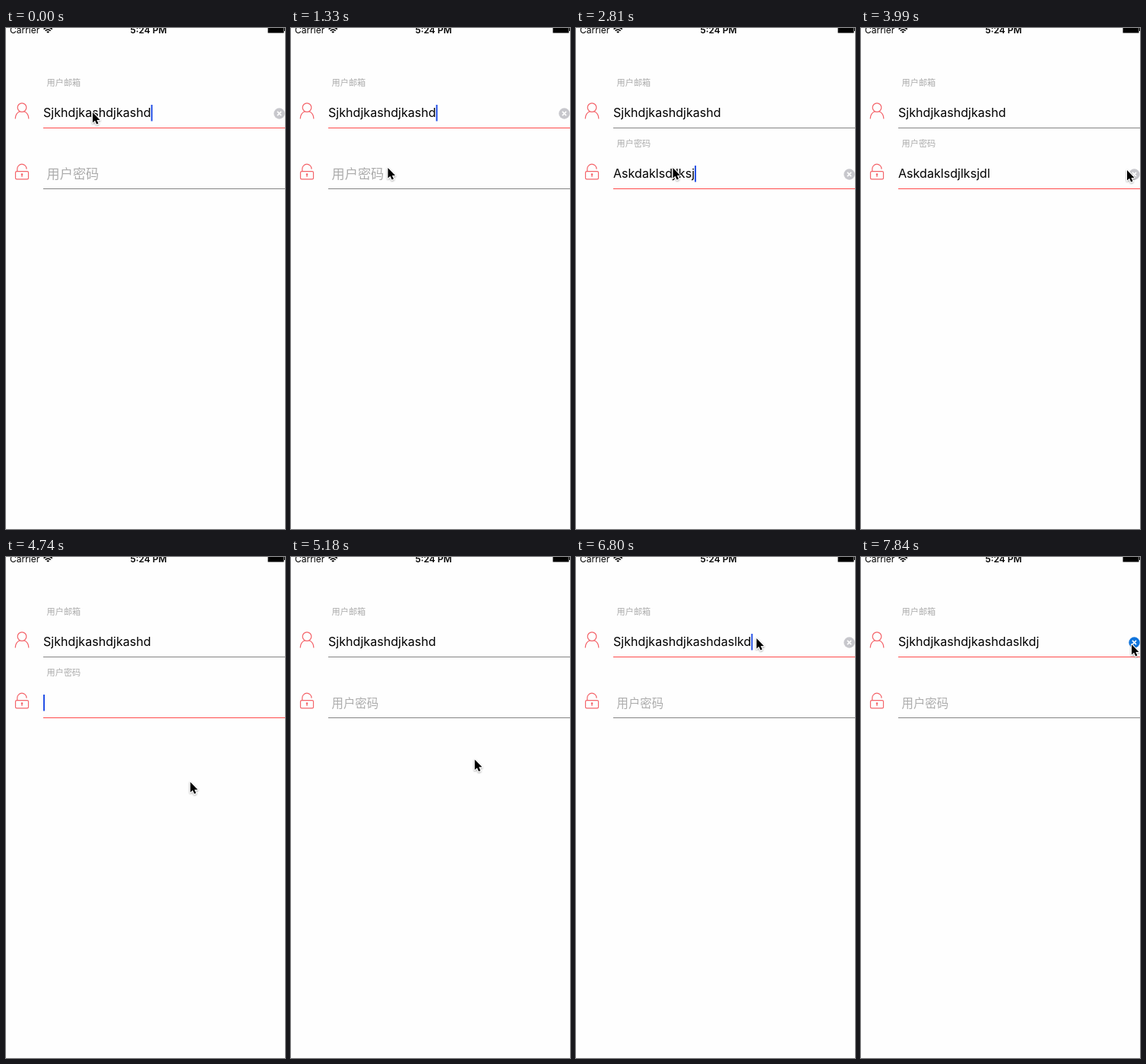
These frames come from a looping animation (367x659 px, 7990 ms). An HTML page:

```html
<!DOCTYPE html>
<html lang="zh">
<head>
<meta charset="utf-8">
<title>Login form</title>
<style>
  html, body { margin: 0; width: 100%; height: 100%; overflow: hidden; background: #fefefe; }
  svg { display: block; width: 367px; height: 659px; }
  text { font-family: Inter, "Liberation Sans", sans-serif; white-space: pre; }
  .value { font-size: 16.1px; }
  .label { font-family: "Noto Sans CJK SC", "Noto Sans CJK", sans-serif; fill: #acacac; }
  .icon { fill: none; stroke: #f4646a; stroke-width: 1.2; stroke-linecap: round; }
  .caret { fill: #2450e6; }
</style>
</head>
<body>
<svg viewBox="0 0 367 659">
  <defs>
    <filter id="shadow" x="-50%" y="-50%" width="200%" height="200%">
      <feDropShadow dx="0" dy="1" stdDeviation="0.8" flood-opacity="0.4"/>
    </filter>
  </defs>
  <rect width="367" height="659" fill="#fefefe"/>

  <text x="5" y="6.6" font-size="12">Carrier</text>
  <g fill="none" stroke="#000" stroke-width="1.6">
    <path d="M49.6 1.6Q55.2 -3.2 60.8 1.6M51.7 3.7Q55.2 .7 58.7 3.7"/>
    <path d="M53.2 4.9Q55.2 3.4 57.2 4.9L55.2 6.8Z" fill="#000" stroke="none"/>
  </g>
  <text x="163.5" y="6.6" font-size="11.9" font-weight="600">5:24 PM</text>
  <path d="M344.5 0H365.5V6.5H344.5ZM366 0H367V4H366Z"/>

  <g class="icon">
    <circle cx="21" cy="104.6" r="5.8"/>
    <path d="M12.3 119C12.5 114.5 14.6 111.2 18.2 109.8M29.8 119C29.6 114.5 27.5 111.2 23.9 109.8"/>
    <rect x="12.5" y="188.7" width="17" height="10.2" rx="1.6"/>
    <path d="M14.8 188.5V185.4A6.1 6.1 0 0 1 27 185.2M21 193V195.6"/>
    <circle cx="21" cy="192.6" r=".7"/>
  </g>

  <g id="email"></g>
  <g id="password"></g>

  <g id="cursor" filter="url(#shadow)">
    <path d="M0 0V13.6L3.1 10.8L5.2 15.6L7.5 14.6L5.4 9.9H9.6Z" stroke="#fff" stroke-width="2" stroke-linejoin="round" paint-order="stroke"/>
  </g>
</svg>
<script>
const LOOP = 7990, STEPS = 54;
const EMAIL = 'Sjkhdjkashdjkashd', EXTRA = 'aslkdj', SECRET = 'Askdaklsdjlksjdl';

// Steps at which the form reacts.
const FOCUS_PASSWORD = 10, TYPE_START = 14, TYPE_END = 21, CLEAR = 29;
const BLUR = 33, FOCUS_EMAIL = 41, EXTRA_END = FOCUS_EMAIL + EXTRA.length;

const POINTER_HOME = { x: 114, y: 111 };
const POINTER_MOVES = [
  { from: 3, to: 5, x: 116, y: 124 },
  { from: 6, to: 9, x: 127.5, y: 184 },
  { from: 22, to: 27, x: 350, y: 187 },
  { from: 30, to: 32, x: 242.5, y: 296 },
  { from: 34, to: 38, x: 237.5, y: 107 },
  { from: 50, to: 53, x: 356, y: 115 }
];

const mix = (a, b, p) => a + (b - a) * p;
const ramp = (n, from, to) => Math.min(1, Math.max(0, (n - from) / (to - from)));
const smooth = p => p * p * (3 - 2 * p);

function pointerAt(n) {
  let { x, y } = POINTER_HOME;
  for (const move of POINTER_MOVES) {
    const p = smooth(ramp(n, move.from, move.to));
    x = mix(x, move.x, p);
    y = mix(y, move.y, p);
  }
  return `translate(${x} ${y})`;
}

// The caret stays lit for four steps after an edit, then blinks every seven.
function blink(idle) {
  const phase = idle % 7;
  return phase < 4 ? 1 : phase === 4 ? .5 : 0;
}

function makeField(id, label, top) {
  const root = document.getElementById(id);
  root.innerHTML = `
    <text class="label" x="53.5">${label}</text>
    <text class="value" x="49" y="${top + 17.3}"></text>
    <rect class="caret" y="${top + 1}" width="2" height="21.5"/>
    <g class="clear" transform="translate(359.5 ${top + 12.5})">
      <circle r="7.2"/>
      <path d="M-2.6 -2.6L2.6 2.6M2.6 -2.6L-2.6 2.6" stroke="#fff" stroke-width="1.5"/>
    </g>
    <rect class="line" x="49" y="${top + 31}" width="318" height="1"/>`;
  const [title, value, caret, clear, line] =
    ['label', 'value', 'caret', 'clear', 'line'].map(name => root.querySelector('.' + name));

  return ({ text, focused, idle, float, restSize, pressed }) => {
    const size = mix(restSize, 11.2, float);
    title.setAttribute('font-size', size);
    title.setAttribute('y', top + mix(12, -28, float) + size * .37);
    value.textContent = text;
    caret.setAttribute('x', 49 + (text ? value.getComputedTextLength() : 0));
    caret.setAttribute('opacity', focused ? blink(idle) : 0);
    clear.setAttribute('visibility', focused && text ? 'visible' : 'hidden');
    clear.setAttribute('fill', pressed ? '#0f74dc' : '#c7c7cc');
    line.setAttribute('fill', focused ? '#ff4a4a' : '#858585');
  };
}

const drawEmail = makeField('email', '用户邮箱', 100);
const drawPassword = makeField('password', '用户密码', 180);
const cursor = document.getElementById('cursor');

function secretAt(n) {
  if (n < TYPE_START || n >= CLEAR) return '';
  const typed = Math.sin(ramp(n, TYPE_START, TYPE_END) * Math.PI / 2);
  return SECRET.slice(0, Math.floor(mix(1, SECRET.length, typed)));
}

function lastSecretEdit(n) {
  if (n >= CLEAR) return CLEAR;
  return n < TYPE_START ? FOCUS_PASSWORD : Math.min(n, TYPE_END);
}

function render(time) {
  const n = Math.min(STEPS - 1, Math.floor((time % LOOP + 8) / (LOOP / STEPS)));
  drawEmail({
    text: EMAIL + EXTRA.slice(0, Math.max(0, n - FOCUS_EMAIL)),
    focused: n < FOCUS_PASSWORD || n >= FOCUS_EMAIL,
    idle: n < FOCUS_PASSWORD ? n : n - Math.min(n, EXTRA_END),
    float: 1, restSize: 17.2, pressed: n === STEPS - 1
  });
  drawPassword({
    text: secretAt(n),
    focused: n >= FOCUS_PASSWORD && n < BLUR,
    idle: n - lastSecretEdit(n),
    float: ramp(n, FOCUS_PASSWORD - 1, FOCUS_PASSWORD + 1) - ramp(n, BLUR - 1, BLUR + 2),
    restSize: n < BLUR ? 17.2 : 15.4, pressed: n === CLEAR - 1
  });
  cursor.setAttribute('transform', pointerAt(n));
}

const start = performance.now();
function tick() {
  render(performance.now() - start);
  requestAnimationFrame(tick);
}
tick();
</script>
</body>
</html>
```
